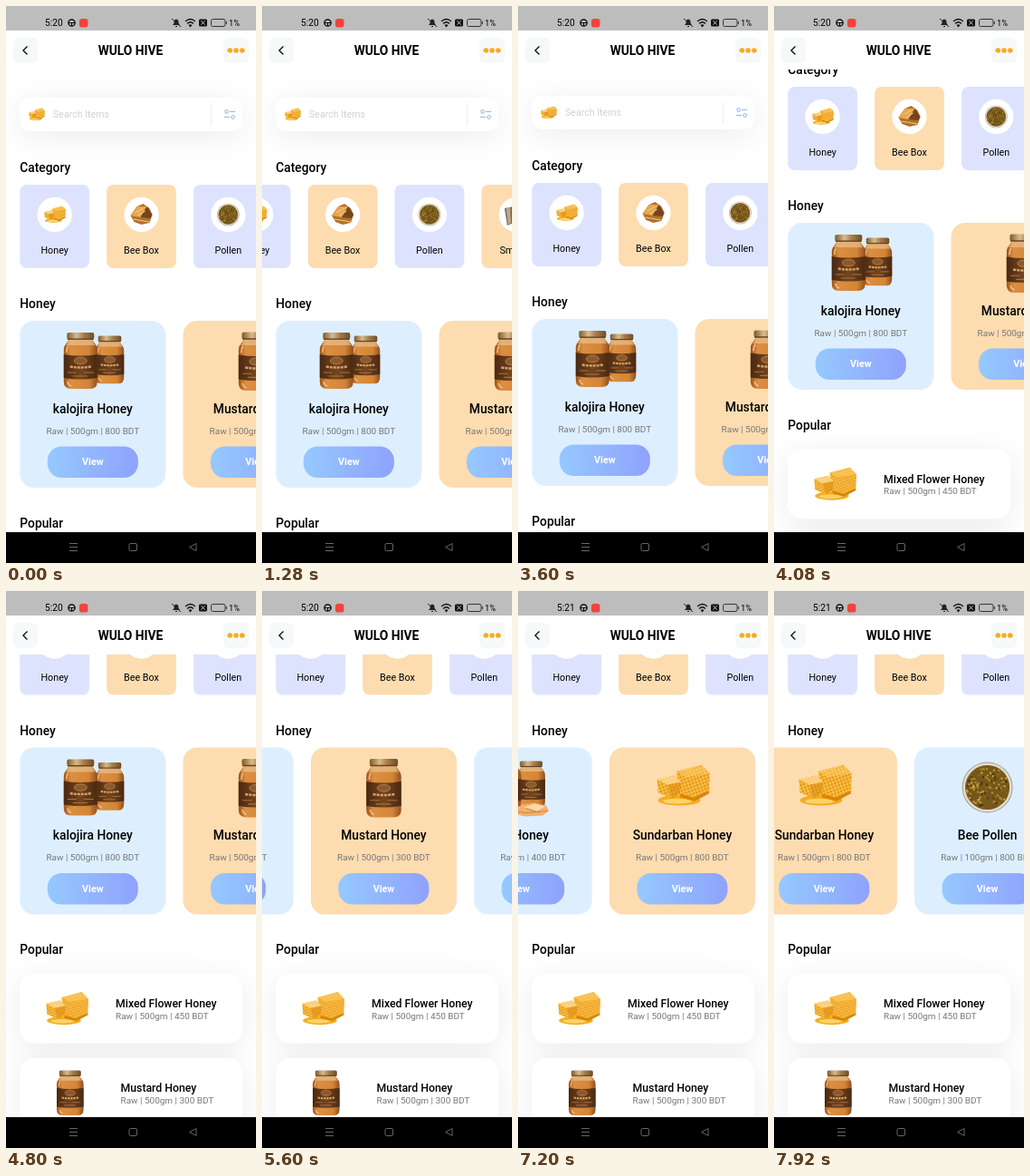
Recreate the animation shown at these times as an HTML page. Size 276x614 px, loop 8 s.

```html
<!DOCTYPE html>
<html lang="en">
<head>
<meta charset="utf-8">
<title>Honey shop</title>
<style>
  html, body { margin: 0; width: 100%; height: 100%; overflow: hidden; background: #fff; }
  svg { display: block; width: 100%; height: 100%; font-family: Roboto, Arial, sans-serif; }
</style>
</head>
<body>
<svg id="stage" viewBox="0 0 276 614"></svg>
<script>
const BLUE = '#ddefff', SAND = '#fddcb0', LILAC = '#dde3ff', PINK = '#ecdefa';
const LOOP = 8000, STEP = 80;
const LEFT = 15.3, TILE_PITCH = 95.83, CARD_PITCH = 180.2;

// Scroll offsets: [time in ms, px]
const CATEGORY_X = [[720, 0], [800, 4], [1040, 4], [1120, 14], [1520, 130], [1760, 195], [1920, 213],
  [2000, 214.7], [2560, 214.7], [2640, 205], [2960, 95], [3200, 25], [3360, 0]];
const PAGE_Y = [[3520, 0], [3600, 2], [3760, 28], [3920, 68], [4080, 108], [4240, 137],
  [4400, 156], [4560, 167], [4800, 174.5]];
const HONEY_X = [[4880, 0], [4960, 4], [5200, 45], [5600, 141.6], [5760, 172], [6000, 200], [6240, 222],
  [6480, 260.6], [6720, 325], [7040, 415], [7360, 495], [7600, 545], [7760, 567], [7920, 581]];
const MINUTE_TURN = 7120;

const rect = (x, y, w, h, r, fill, more = '') =>
  `<rect x="${x}" y="${y}" width="${w}" height="${h}" rx="${r}" fill="${fill}" ${more}/>`;
const circle = (x, y, r, fill, more = '') => `<circle cx="${x}" cy="${y}" r="${r}" fill="${fill}" ${more}/>`;
const shape = (d, fill, more = '') => `<path d="${d}" fill="${fill}" ${more}/>`;
const line = (d, color, width = 1, more = '') =>
  `<path d="${d}" fill="none" stroke="${color}" stroke-width="${width}" ${more}/>`;
const text = (x, y, size, str, { fill = '#000', weight = 400, anchor = 'start', id = '' } = {}) =>
  `<text x="${x}" y="${y}" font-size="${size}" font-weight="${weight}" fill="${fill}" text-anchor="${anchor}"${id && ` id="${id}"`}>${str}</text>`;
const use = (id, x, y, scale = 1) => `<use href="#${id}" transform="translate(${x} ${y}) scale(${scale})"/>`;
const shadowed = (x, y, w, h, r) =>
  rect(x, y + 6, w, h, r, '#000', 'opacity=".075" filter="url(#soft)"') + rect(x, y, w, h, r, '#fff');

function pollenDots() {
  let seed = 11, out = '';
  const rnd = () => (seed = (seed * 16807) % 2147483647) / 2147483647;
  const tones = ['#b58a2c', '#8d6a1c', '#4c3a12', '#c99f3f', '#6e5216'];
  for (let i = 0; i < 150; i++) {
    const a = rnd() * 6.283, d = Math.sqrt(rnd()) * 23;
    out += circle((d * Math.cos(a)).toFixed(1), (d * Math.sin(a)).toFixed(1), 1.2, tones[i % 5]);
  }
  return out;
}

const defs = `<defs>
  <filter id="soft" x="-30%" y="-200%" width="160%" height="500%"><feGaussianBlur stdDeviation="18"/></filter>
  <clipPath id="view"><rect y="70" width="276" height="510"/></clipPath>
  <linearGradient id="button"><stop stop-color="#95c9fe"/><stop offset="1" stop-color="#8fa2fd"/></linearGradient>
  <linearGradient id="amber"><stop stop-color="#9c5219"/><stop offset=".2" stop-color="#dc8f42"/>
    <stop offset=".75" stop-color="#d48537"/><stop offset="1" stop-color="#93501e"/></linearGradient>
  <linearGradient id="lid"><stop stop-color="#7d5a30"/><stop offset=".35" stop-color="#d9bb8b"/>
    <stop offset=".6" stop-color="#a88150"/><stop offset="1" stop-color="#6f4d28"/></linearGradient>
  <linearGradient id="label"><stop stop-color="#4a2812"/><stop offset=".5" stop-color="#74451f"/><stop offset="1" stop-color="#4a2812"/></linearGradient>
  <pattern id="cells" width="3.4" height="3.4" patternUnits="userSpaceOnUse" patternTransform="rotate(-20)">
    <rect width="3.4" height="3.4" fill="#fac04a"/><circle cx="1.7" cy="1.7" r="1.2" fill="#e2920f"/></pattern>
  <g id="jar">
    ${shape('M5 7C5 12 0 12 0 19V54Q0 62 8 62H29Q37 62 37 54V19C37 12 32 12 32 7Z', 'url(#amber)')}
    ${shape('M5 8H32Q32 12 35 14H2Q5 12 5 8Z', '#e8c08d', 'opacity=".7"')}
    ${rect(3.5, 0, 30, 7.5, 2, 'url(#lid)')}${rect(4, 6.5, 29, 1.3, 0, '#5f4123')}
    ${shape('M0 24Q18.500 27 37 24V50Q18.500 53 0 50Z', 'url(#label)')}
    <ellipse cx="18.5" cy="31" rx="7" ry="3.6" fill="#8a5a2c" stroke="#bd8a4c" stroke-width=".8"/>
    ${line('M7 37.500Q18.500 39.500 30 37.500', '#d3a467', 2.4, 'stroke-dasharray="3 1"')}
    ${line('M4 44H14M22 44H33M10 48H26', '#a8743e', 1.1)}
    ${line('M5 15Q3 17 3 22M4 54Q5 58 8 59', '#ffdca5', 1.6, 'opacity=".7"')}
  </g>
  <g id="comb">
    <ellipse cx="27" cy="37" rx="22" ry="5.5" fill="#f6ac22"/><ellipse cx="25" cy="38" rx="15" ry="2.6" fill="#fdd368"/>
    ${shape('M27 29L42 34L58 26V30L43 38L28 34Z', '#d98608')}
    ${shape('M24 7L50 0L59 9L58 27L42 34L27 30Z', 'url(#cells)')}
    ${shape('M24 7L50 0L59 9L34 13Z', '#ffd677', 'opacity=".45"')}
    ${shape('M4 15L22 11L29 18L28 30L19 35L5 29Z', 'url(#cells)')}
    ${shape('M4 15L22 11L29 18L15 21Z', '#ffe0a0', 'opacity=".7"')}
    ${shape('M15 21L29 18L28 30L19 35Z', '#d98608', 'opacity=".5"')}
  </g>
  <g id="slab">
    ${shape('M0 7L12 2L25 0L38 3L41 9L34 14L14 15L3 12Z', '#f0b070')}
    ${shape('M13 5L25 1L37 4L28 9Z', '#fbd9a8')}${line('M2 9L15 11L39 9M16 6L30 11', '#d3873a', 1)}
  </g>
  <g id="pollen">${circle(0, 0, 28, '#a89e92')}${circle(0, 0, 27, '#e4ddd2')}${circle(0, 0, 24.5, '#75581b')}${pollenDots()}</g>
  <g id="beebox">
    ${shape('M-12 1L-5 -9L2 -12L9 -7L12 0L9 9L0 11L-8 8Z', '#b3702a')}
    ${shape('M-12 1L-5 -9L6 -9L-1 3Z', '#e6a54d')}${shape('M-1 3L6 -9L12 0L10 4Z', '#75451d')}
    ${line('M-9 5L9 8M-7 -2L2 -7M-4 1L4 -4', '#f3cb85', 1.1)}
  </g>
  <g id="smoker">
    ${shape('M-13 -7L-3 -9L-3 9L-10 12Z', '#84705c')}${shape('M-11 -7L-7 -8L-6 9L-9 11Z', '#bda88f')}
    ${shape('M-3 -1L3 -2L4 12L-3 12Z', '#a6a8ab')}${shape('M-2 -2L1 -8L4 -7L3 -2Z', '#c7c9cb')}
    ${shape('M5 -6L12 -9L11 11L5 10Z', '#4b4540')}${line('M7 -6V9M9.500 -7V10', '#b5ada5', 1)}${line('M4 -7L11 -13', '#8b8d91', 1.2)}
  </g>
  <g id="craft">
    ${shape('M-9 -6Q-5 -13 3 -12Q11 -9 10 0Q9 10 0 10Q-10 9 -11 1Z', '#d8283a')}
    ${line('M-5 -6L5 -8M-6 -1L6 -4M-5 4L6 1', '#4f3f9a', 2)}${line('M-4 -9L-2 7M2 -10L4 6', '#f0a7a8', .8)}
    ${line('M6 6L11 11M-7 6L-10 11', '#bc1f30', 1.6)}
  </g>
</defs>`;

function category([name, color, art], i) {
  const x = LEFT + TILE_PITCH * i, mid = x + 38.35;
  return rect(x, 197, 76.7, 92, 7.5, color) + circle(mid, 230, 19.2, '#fff') + art(mid) +
    text(mid, 273, 10.73, name, { anchor: 'middle' });
}

function honeyCard([name, note, art], i) {
  const x = LEFT + CARD_PITCH * i, mid = x + 80.5, anchor = 'middle';
  return rect(x, 347, 161, 184, 15.5, i % 2 ? SAND : BLUE) + art(mid) +
    text(mid, 448.5, 13.8, name, { weight: 500, anchor }) +
    text(mid, 471.6, 9.97, 'Raw | ' + note + ' BDT', { fill: '#777', anchor }) +
    rect(mid - 50, 485.5, 100, 34.5, 15.5, 'url(#button)') +
    text(mid, 506.4, 10.73, 'View', { fill: '#fff', weight: 700, anchor });
}

const popularItem = (y, x, name, note, art) =>
  shadowed(15, y, 246, 77, 16) + art +
  text(x, y + 37.3, 12.27, name, { weight: 500 }) + text(x, y + 49.8, 9.97, 'Raw | ' + note + ' BDT', { fill: '#777' });

const categories = [
  ['Honey', LILAC, m => use('comb', m - 13, 220.5, .43)],
  ['Bee Box', SAND, m => use('beebox', m, 230)],
  ['Pollen', LILAC, m => use('pollen', m, 230, .44)],
  ['Smoker', SAND, m => use('smoker', m, 230)],
  ['Hand Made', PINK, m => use('craft', m, 230)]
];
const honeys = [
  ['kalojira Honey', '500gm | 800', m => use('jar', m + 3, 363.5, .85) + use('jar', m - 32, 360)],
  ['Mustard Honey', '500gm | 300', m => use('jar', m - 19.2, 359.5, 1.04)],
  ['Mix Honey', '500gm | 400', m => use('jar', m - 2, 362, .83) + use('jar', m - 32, 359.5, .92) + use('slab', m - 8, 408)],
  ['Sundarban Honey', '500gm | 800', m => use('comb', m - 32, 366, 1.06)],
  ['Bee Pollen', '100gm | 800', m => use('pollen', m, 391)]
];

const heading = (y, str) => text(LEFT, y, 13.8, str, { weight: 500 });

const page = `<g clip-path="url(#view)"><g id="page">
  ${shadowed(15, 101, 246, 37, 12)}
  ${use('comb', 24, 112.5, .32)}
  ${text(52, 123.3, 10.6, 'Search Items', { fill: '#d2d2d2' })}
  ${line('M226.5 108V132', '#eee')}
  ${line('M247 116.5H253M241 122.5H247', '#9db1f8', 1.2)}
  ${circle(243.5, 116.5, 1.8, 'none', 'stroke="#8ca4f7"')}${circle(250.5, 122.5, 1.8, 'none', 'stroke="#8ca4f7"')}
  ${heading(574.6, 'Popular')}
  ${popularItem(596.5, 121, 'Mixed Flower Honey', '500gm | 450', use('comb', 41, 616.5, .85))}
  ${popularItem(689.5, 126.5, 'Mustard Honey', '500gm | 300', use('jar', 56, 703, .8))}
  ${heading(182.6, 'Category')}
  <g id="cats">${categories.map(category).join('')}</g>
  ${heading(333, 'Honey')}
  <g id="cards">${honeys.map(honeyCard).join('')}</g>
</g></g>`;

const header = rect(0, 27, 276, 43, 0, '#fff') +
  rect(8, 35, 27, 28, 6, '#f6f9f9') + line('M23.5 44.5L19 49L23.5 53.5', '#111', 1.4) +
  text(137.5, 54, 13.8, 'WULO HIVE', { weight: 700, anchor: 'middle' }) +
  rect(240, 35, 28, 28, 6, '#f6f9f9') +
  [247.2, 254, 260.8].map(x => circle(x, 49, 2.8, '#fbab1c')).join('');

const status = rect(0, 0, 276, 27, 0, '#bdbdbd') +
  text(43, 22, 10.2, '5:20', { id: 'clock' }) +
  circle(72.5, 18.5, 3.6, 'none', 'stroke="#111" stroke-width="1.5"') + line('M69 18.5H76M72.5 18.5V22', '#111', 1.2) +
  rect(81, 14, 9.5, 9.5, 2.8, '#f0443e') +
  shape('M184 21L185.5 19V17Q186 14.500 188 14.500Q190 14.500 190.500 17V19L192 21ZM187 22H189V23H187Z', '#222') +
  line('M183 14L193 23', '#222', 1) +
  line('M198 17Q203.500 12 209 17M200 19.500Q203.500 16 207 19.500', '#111', 1.2) + shape('M201.500 21Q203.500 19.500 205.500 21L203.500 23.500Z', '#111') +
  rect(213, 14.5, 9, 8, 1.5, '#111') + line('M215.500 16.500L219.500 20.500M219.500 16.500L215.500 20.500', '#ddd') +
  rect(226.5, 14.5, 15.5, 8, 2, 'none', 'stroke="#333"') + rect(242.8, 17, 1, 3, 0, '#333') +
  text(246, 22, 9.2, '1%');

const nav = rect(0, 580, 276, 34, 0, '#000') +
  line('M70 592.5H79M70 596.5H79M70 600.5H79', '#666') +
  rect(136, 592.5, 8.5, 8, 1.5, 'none', 'stroke="#666"') +
  line('M210 592.5V600.5L202.500 596.500Z', '#666', 1, 'stroke-linejoin="round"');

const $ = id => document.getElementById(id);
$('stage').innerHTML = defs + rect(0, 0, 276, 614, 0, '#fff') + page + header + status + nav;
const pageEl = $('page'), catsEl = $('cats'), cardsEl = $('cards'), clock = $('clock');

function offsetAt(table, t) {
  const next = table.findIndex(([time]) => time > t);
  if (next === 0) return table[0][1];
  if (next < 0) return table[table.length - 1][1];
  const [t0, a] = table[next - 1], [t1, b] = table[next];
  return a + (b - a) * (t - t0) / (t1 - t0);
}

const move = (el, x, y) => el.setAttribute('transform', `translate(${x} ${y})`);

const start = performance.now();
function draw() {
  const elapsed = (performance.now() - start) % LOOP;
  const t = Math.floor(elapsed / STEP) * STEP;
  move(catsEl, -offsetAt(CATEGORY_X, t), 0);
  move(cardsEl, -offsetAt(HONEY_X, t), 0);
  move(pageEl, 0, -offsetAt(PAGE_Y, t));
  clock.textContent = t < MINUTE_TURN ? '5:20' : '5:21';
  requestAnimationFrame(draw);
}
draw();
</script>
</body>
</html>
```
